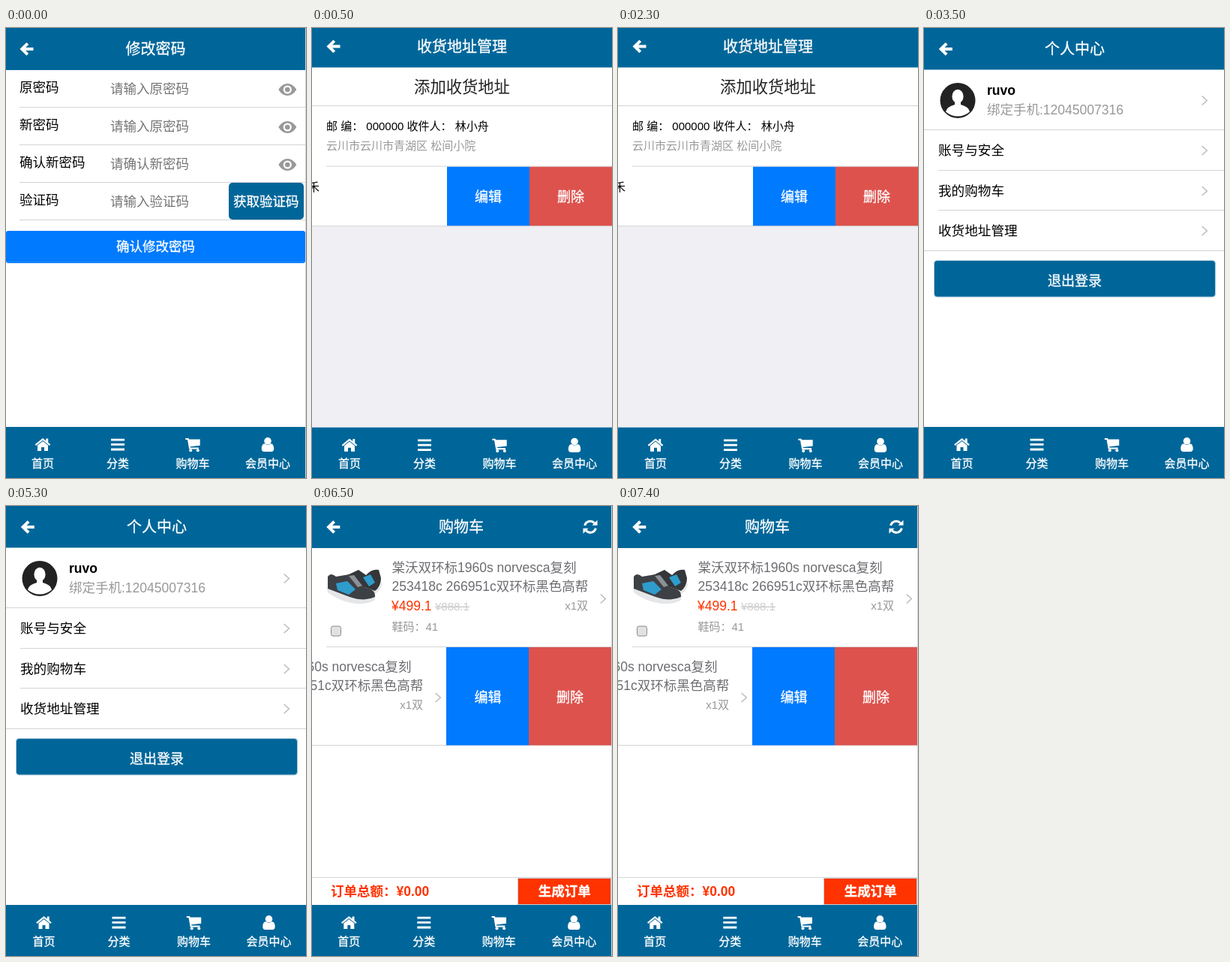
Animation, 400 px wide and 599 px high, one loop 8 s. Source, as an HTML page:

```html
<!DOCTYPE html>
<html lang="zh-CN">
<head>
<meta charset="utf-8">
<title>Mobile shop pages</title>
<style>
  html, body { margin: 0; width: 100%; height: 100%; overflow: hidden; background: #fff; }
  .stage {
    display: block; width: 400px; height: 599px; overflow: hidden;
    font: 17.5px "Liberation Sans", "Noto Sans CJK SC", "Noto Sans CJK", sans-serif;
  }
  /* Each page is 400px wide; the strip jumps from one to the next. */
  .strip { animation: pages 8s step-end infinite; }
  @keyframes pages {
    0% { transform: translateX(0); }
    6.25% { transform: translateX(-400px); }
    43.75% { transform: translateX(-800px); }
    81.25%, 100% { transform: translateX(-1200px); }
  }
  .mid { text-anchor: middle; }
  .end { text-anchor: end; }
  .white { fill: #fff; }
  text.white { stroke: #fff; stroke-width: .3; }
  .tab { color: #fff; fill: currentColor; }
  .tab text { stroke: currentColor; stroke-width: .3; }
  .bar { fill: #069; }
  .blue { fill: #007aff; }
  .red { fill: #dd524d; }
  .hot { fill: #f30; }
  .hint { fill: #757575; }
  .soft { fill: #999; }
  .bold { font-weight: bold; }
  .s15 { font-size: 15px; }
  .s18 { font-size: 18px; }
  .s20 { font-size: 20px; }
  .rule { fill: none; stroke: #d4d4d6; }
  .next { fill: none; stroke: #bbb; stroke-width: 1.5; }
</style>
</head>
<body>
<svg class="stage" width="400" height="599">
  <defs>
    <g id="back" fill="none" stroke="#fff" stroke-width="4">
      <path d="M1.3-7.4-6.2 0 1.3 7.4M-5 0H9"/>
    </g>
    <path id="next" class="next" d="M-3.3-6 3.3 0-3.3 6"/>
    <g id="eye">
      <path class="soft" d="M-12 0Q-7-8 0-8T12 0Q7 8 0 8T-12 0Z"/>
      <circle class="white" r="5.6"/>
      <circle class="soft" r="3.3"/>
    </g>
    <g id="arc">
      <path d="M-7.3-1.8A7.5 7.5 0 0 1 5.6-5" fill="none" stroke="#fff" stroke-width="3"/>
      <path class="white" d="M9.5-9V-2H2.5Z"/>
    </g>

    <g id="home" class="tab">
      <path d="M-9.6 555.2 0 547.3 9.6 555.2" fill="none" stroke="currentColor" stroke-width="2.2"/>
      <path d="M4.3 546.4H7.2V553.5L4.3 551ZM-7 555.6 0 549.9 7 555.6V563H2V558H-2V563H-7Z"/>
      <text class="mid s15" y="584.7">首页</text>
    </g>
    <g id="list" class="tab">
      <path d="M-9 546.8H9V549.6H-9ZM-9 553H9V555.8H-9ZM-9 559.6H9V562.4H-9Z"/>
      <text class="mid s15" y="584.7">分类</text>
    </g>
    <g id="cart" class="tab">
      <path d="M-9.7 546H-5.5L-5 547.6H9.7V555.7L-3.4 557.3 -3 558.4H8V560.6H-4.8L-7 548H-9.7Z"/>
      <circle cx="-2.8" cy="562.3" r="2"/>
      <circle cx="6.8" cy="562.3" r="2"/>
      <text class="mid s15" y="584.7">购物车</text>
    </g>
    <g id="user" class="tab">
      <circle cy="549.8" r="4.8"/>
      <path d="M-8.2 560C-8.2 556-6.7 553.2-4.2 553.2Q0 556.6 4.2 553.2C6.7 553.2 8.2 556 8.2 560Q8.2 564 4.6 564H-4.6Q-8.2 564-8.2 560Z"/>
      <text class="mid s15" y="584.7">会员中心</text>
    </g>
    <g id="nav">
      <use href="#home"/>
      <use href="#list" x="100"/>
      <use href="#cart" x="200" style="fill:var(--cart, #fff)"/>
      <use href="#user" x="300" style="fill:var(--user, #fff)"/>
    </g>

    <g id="shoes">
      <path fill="#e4e6e8" d="M60 105 84 112Q91 109 92 101L93 104Q92 112 84 117Z"/>
      <path fill="#34363a" d="M47 92 62 85 72 92Q80 83 89 85L92 96Q92 107 84 113L64 106Z"/>
      <path fill="#2e9ccc" d="M68 95 78 91 84 102 76 107Z"/>
      <path fill="#e4e6e8" d="M20 109 50 121Q70 129 84 121V125Q76 131 58 130 36 127 21 115Z"/>
      <path fill="#3d4045" d="M21 94Q25 88 32 94L50 91Q60 106 76 110 85 113 84 121 70 128 50 121L21 110Z"/>
      <path fill="#2e9ccc" d="M32 103 47 100 58 111 49 118 34 112Z"/>
      <path fill="#8d9197" d="M49 93 56 92 67 106 61 108Z"/>
    </g>
    <g id="item">
      <use href="#shoes"/>
      <g fill="#6d6d72">
        <text x="106.5" y="88">棠沃双环标1960s norvesca复刻</text>
        <text x="106.5" y="113">253418c 266951c双环标黑色高帮</text>
      </g>
      <text class="hot" x="106" y="139">¥499.1</text>
      <text class="s15" x="164" y="139" fill="#ccc" text-decoration="line-through">¥888.1</text>
      <text class="soft s15 end" x="368" y="138">x1双</text>
      <text class="soft s15" x="106.5" y="166">鞋码：41</text>
      <rect x="25.5" y="160" width="13" height="13" rx="2.5" fill="#e2e2e2" stroke="#8a8a8a"/>
      <use href="#next" x="388" y="123.5"/>
    </g>
  </defs>

  <g class="strip">
    <!-- Change password -->
    <svg width="400" height="599">
      <rect class="white" width="400" height="599"/>
      <path class="rule" d="M18 105.5H399M18 155.5H399M18 205.5H399M18 255.5H399M399.5 0V599"/>
      <rect class="bar" width="399" height="56"/>
      <use href="#back" x="27.5" y="28"/>
      <text class="mid white s20" x="199.5" y="35">修改密码</text>
      <text x="18" y="85">原密码</text>
      <text x="18" y="135">新密码</text>
      <text x="18" y="185">确认新密码</text>
      <text x="18" y="235">验证码</text>
      <g class="hint">
        <text x="139" y="86.5">请输入原密码</text>
        <text x="139" y="136.5">请输入原密码</text>
        <text x="139" y="186.5">请确认新密码</text>
        <text x="139" y="236.5">请输入验证码</text>
      </g>
      <use href="#eye" x="375.3" y="82"/>
      <use href="#eye" x="375.3" y="132"/>
      <use href="#eye" x="375.3" y="182"/>
      <rect class="bar" x="297" y="206" width="100" height="49" rx="5"/>
      <text class="mid white" x="346.8" y="236.5">获取验证码</text>
      <rect class="blue" y="270" width="399" height="43" rx="3"/>
      <path d="M1 311.5H398" stroke="#2a90f8"/>
      <text class="mid white" x="199.5" y="297">确认修改密码</text>
      <rect class="bar" y="531" width="399" height="68"/>
      <use href="#nav" x="49"/>
    </svg>

    <!-- Delivery addresses -->
    <svg x="400" width="400" height="599">
      <rect width="400" height="599" fill="#efeff4"/>
      <rect class="white" y="52" width="400" height="212"/>
      <rect class="bar" width="400" height="52.5"/>
      <use href="#back" x="28.5" y="24.5"/>
      <text class="mid white s20" x="200" y="31.5">收货地址管理</text>
      <text class="mid" x="200" y="85.7" font-size="21.3" fill="#222">添加收货地址</text>
      <g class="s15">
        <text x="19" y="135.7">邮 编： 000000 收件人： 林小舟</text>
        <text class="soft" x="19" y="162">云川市云川市青湖区 松间小院</text>
        <text x="-5" y="216.5">禾</text>
      </g>
      <rect class="blue" x="180" y="184.5" width="110" height="79.5"/>
      <rect class="red" x="290" y="184.5" width="110" height="79.5"/>
      <path class="rule" d="M0 103.5H400M19 184H400M0 263.7H400"/>
      <text class="mid white s18" x="235" y="231">编辑</text>
      <text class="mid white s18" x="345" y="231">删除</text>
      <rect class="bar" y="531.7" width="400" height="68"/>
      <use href="#nav" x="50" y=".7"/>
    </svg>

    <!-- Member centre -->
    <svg x="800" width="400" height="599">
      <rect class="white" width="400" height="599"/>
      <path class="rule" d="M0 135.5H400M19 189.5H400M19 242.5H400M0 296.5H400"/>
      <rect class="bar" width="400" height="55.5"/>
      <use href="#back" x="28.8" y="28"/>
      <text class="mid white s20" x="201" y="35">个人中心</text>
      <circle cx="45" cy="96.5" r="23.5" fill="#222"/>
      <ellipse class="white" cx="45" cy="91" rx="7.6" ry="9.2"/>
      <path class="white" d="M41 97H49V102Q60 105 61 111.5 54 117.5 45 117.5T29 111.5Q30 105 41 102Z"/>
      <text class="bold" x="84" y="89">ruvo</text>
      <text class="soft" x="84" y="115">绑定手机:12045007316</text>
      <g font-size="17.6">
        <text x="19" y="169">账号与安全</text>
        <text x="19" y="223">我的购物车</text>
        <text x="19" y="276">收货地址管理</text>
      </g>
      <use href="#next" x="374" y="96.5"/>
      <use href="#next" x="374" y="163"/>
      <use href="#next" x="374" y="217"/>
      <use href="#next" x="374" y="270"/>
      <rect class="bar" x="13.5" y="309.5" width="375" height="48.5" rx="4" stroke="#a9c8d9"/>
      <text class="mid white s18" x="201" y="342.5">退出登录</text>
      <rect class="bar" y="531" width="400" height="68"/>
      <use href="#nav" x="50.5" style="--user:orange"/>
    </svg>

    <!-- Shopping cart -->
    <svg x="1200" width="400" height="599">
      <rect class="white" width="400" height="599"/>
      <path class="rule" d="M19 187.5H399M0 318.5H399M0 494.5H399M399.5 0V599"/>
      <rect class="bar" width="399" height="56"/>
      <use href="#back" x="28.3" y="28"/>
      <text class="mid white s20" x="199" y="35">购物车</text>
      <g transform="translate(371 27.8)">
        <use href="#arc"/>
        <use href="#arc" transform="rotate(180)"/>
      </g>
      <use href="#item"/>
      <use href="#item" x="-220" y="131.5"/>
      <rect class="blue" x="179" y="188" width="110" height="130.5"/>
      <rect class="red" x="289" y="188" width="110" height="130.5"/>
      <text class="mid white s18" x="234.5" y="260.5">编辑</text>
      <text class="mid white s18" x="344" y="260.5">删除</text>
      <text class="hot bold" x="25" y="519">订单总额：¥0.00</text>
      <rect class="hot" x="274.5" y="495.5" width="124" height="35" stroke="#ccc"/>
      <text class="mid white bold" x="336.8" y="519">生成订单</text>
      <rect class="bar" y="531" width="399" height="68"/>
      <use href="#nav" x="49.3" style="--cart:orange"/>
    </svg>
  </g>
</svg>
<script>
</script>
</body>
</html>
```
